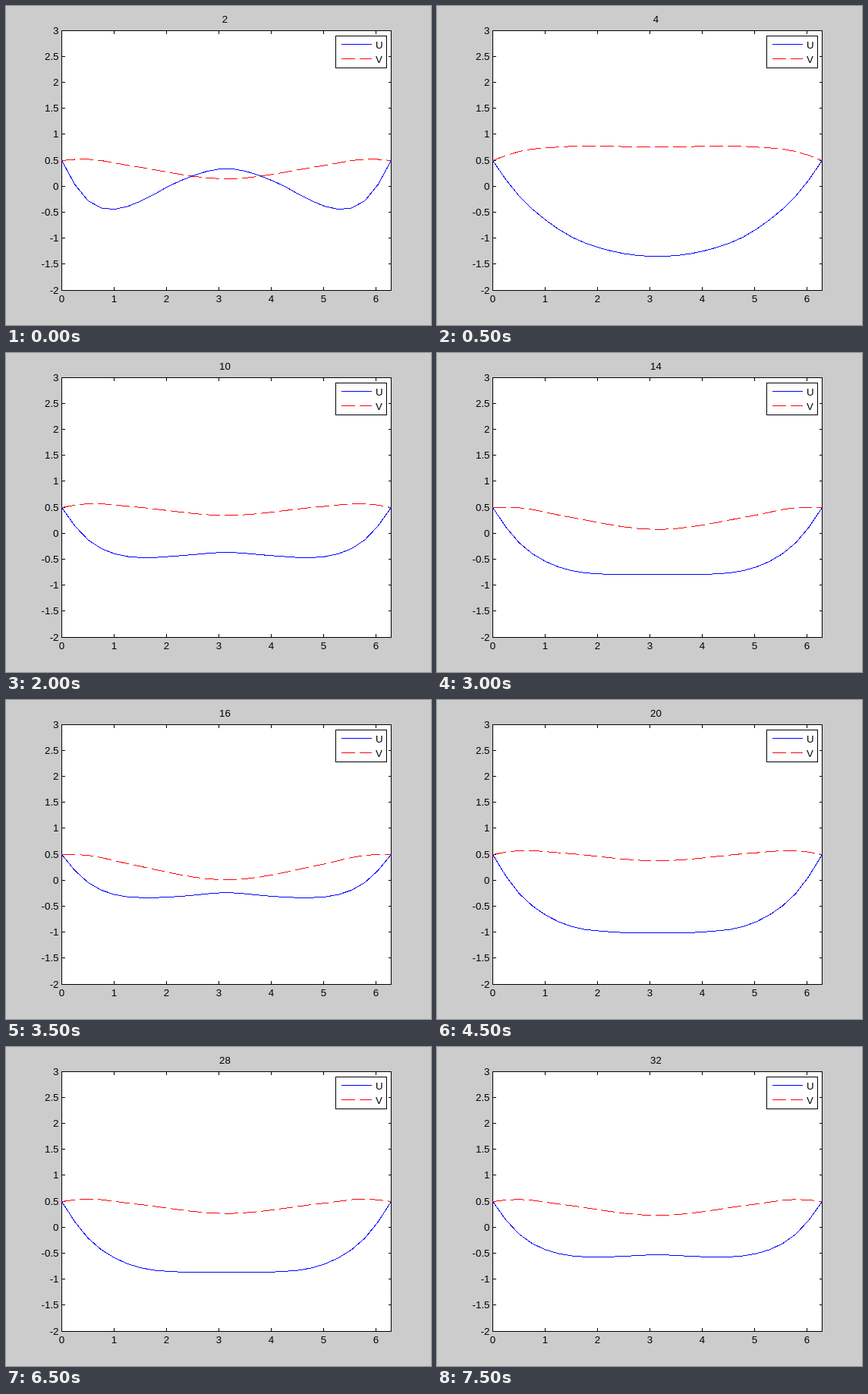
An HTML page that plays this animation: 560 px wide and 420 px high, repeating every 8000 ms.

```html
<!DOCTYPE html>
<html lang="en">
<head>
<meta charset="utf-8">
<title>U and V over time</title>
<style>
  html, body { margin: 0; width: 100%; height: 100%; overflow: hidden; background: #ccc; }
  svg { display: block; width: 560px; height: 420px; }
  text { font: 13.33px "Liberation Sans", Arial, sans-serif; }
  path, rect { fill: none; stroke: #000; stroke-width: 1; shape-rendering: crispEdges; }
  .paper { fill: #fff; }
  .u { stroke: #00f; }
  .v { stroke: #f00; stroke-dasharray: 18 6; }
  .mid { text-anchor: middle; }
  .end { text-anchor: end; }
</style>
</head>
<body>
<svg id="stage" viewBox="0 0 560 420"></svg>
<script>
const STEP_MS = 500;
const STEPS = 16;
const EDGE = 0.5;              // both curves are pinned to this value at the ends
const LENGTH = 2 * Math.PI;
const CELLS = 25;

// Both curves ring down towards a resting shape. Each key point of the left half
// has a resting height and its share of the two swing phases and the start-up kick.
const U_POINTS = [
  { x: 0.5, rest: -0.155, cos: 0.255, sin: -0.05, kick: -0.29 },
  { x: 1, rest: -0.487, cos: 0.481, sin: -0.06, kick: -0.293 },
  { x: 1.5, rest: -0.636, cos: 0.69, sin: -0.058, kick: -0.153 },
  { x: 2.2, rest: -0.68, cos: 0.844, sin: -0.04, kick: 0.13 },
  { x: Math.PI, rest: -0.66, cos: 0.97, sin: -0.04, kick: 0.273 }
];
const V_POINTS = [
  { x: 0.5, rest: 0.54, cos: -0.101, sin: 0.123, kick: 0 },
  { x: 1.3, rest: 0.446, cos: -0.246, sin: 0.286, kick: 0 },
  { x: Math.PI, rest: 0.235, cos: -0.416, sin: 0.4615, kick: 0 }
];

function heightsAt(points, step) {
  const swing = 1.035 * 0.9 ** step;
  const phase = (96.5 * step - 63) * Math.PI / 180;
  const kick = (-0.5) ** (step - 1);
  return points.map(p =>
    p.rest + swing * (p.cos * Math.cos(phase) + p.sin * Math.sin(phase)) + kick * p.kick);
}

const LEFT = 73.5, RIGHT = 507.5, TOP = 32.5, BOTTOM = 374.5;
const toX = x => LEFT + x / LENGTH * (RIGHT - LEFT);
const toY = y => BOTTOM - (y + 2) / 5 * (BOTTOM - TOP);
const crisp = n => Math.floor(n - 0.5 + 1e-6) + 0.5;

const stage = document.getElementById('stage');

function add(tag, attributes, content = '') {
  const node = document.createElementNS('http://www.w3.org/2000/svg', tag);
  for (const key in attributes) node.setAttribute(key, attributes[key]);
  node.textContent = content;
  return stage.appendChild(node);
}
const label = (x, y, content, align = '') => add('text', { x, y, class: align }, content);
const line = (d, name = '') => add('path', { d, class: name });
const box = (x, y, width, height) => add('rect', { x, y, width, height, class: 'paper' });

// Smooth curve through the key points, mirrored about the centre of the domain.
function smoothCurve(points, step) {
  const xs = [0, ...points.map(p => p.x)];
  const ys = [EDGE, ...heightsAt(points, step)];
  const last = xs.length - 1;
  const gap = i => xs[i + 1] - xs[i];
  const slope = i => (ys[i + 1] - ys[i]) / gap(i);
  const tangents = xs.map((_, i) => i === 0 || i === last ? 0 :
    (gap(i) * slope(i - 1) + gap(i - 1) * slope(i)) / (gap(i - 1) + gap(i)));
  tangents[0] = 2 * slope(0) - tangents[1];

  return position => {
    const x = Math.min(position, LENGTH - position);
    let i = 0;
    while (i < last - 1 && x > xs[i + 1]) i++;
    const h = gap(i), s = (x - xs[i]) / h, r = 1 - s;
    return ys[i] * r * r * (1 + 2 * s) + ys[i + 1] * s * s * (3 - 2 * s)
      + h * s * r * (tangents[i] * r - tangents[i + 1] * s);
  };
}

function curvePath(points, step) {
  const curve = smoothCurve(points, step);
  const vertices = Array.from({ length: CELLS + 1 }, (_, i) => {
    const x = LENGTH * i / CELLS;
    return toX(x).toFixed(2) + ' ' + toY(curve(x)).toFixed(2);
  });
  return 'M' + vertices.join('L');
}

box(LEFT, TOP, RIGHT - LEFT, BOTTOM - TOP);
for (let x = 0; x <= 6; x++) {
  const px = crisp(toX(x));
  line(`M${px} ${BOTTOM}v-5M${px} ${TOP}v4`);
  label(px, 390, x, 'mid');
}
for (let y = -2; y <= 3; y += 0.5) {
  const py = crisp(toY(y));
  line(`M${LEFT} ${py}h4M${RIGHT} ${py}h-4`);
  label(69.5, py + 4.5, y, 'end');
}

const uCurve = line('', 'u');
const vCurve = line('', 'v');
const title = label(288.5, 22, '', 'mid');

box(434.5, 39.5, 67, 42);
line('M442 50.5H482', 'u');
line('M442 69.5H482', 'v');
label(487, 56, 'U');
label(487, 75, 'V');

let shown = 0;
function draw(time) {
  const step = 1 + Math.floor(time / STEP_MS) % STEPS;
  if (step === shown) return;
  shown = step;
  title.textContent = 2 * step;
  uCurve.setAttribute('d', curvePath(U_POINTS, step));
  vCurve.setAttribute('d', curvePath(V_POINTS, step));
}

function tick() {
  draw(performance.now());
  requestAnimationFrame(tick);
}
tick();
</script>
</body>
</html>
```
